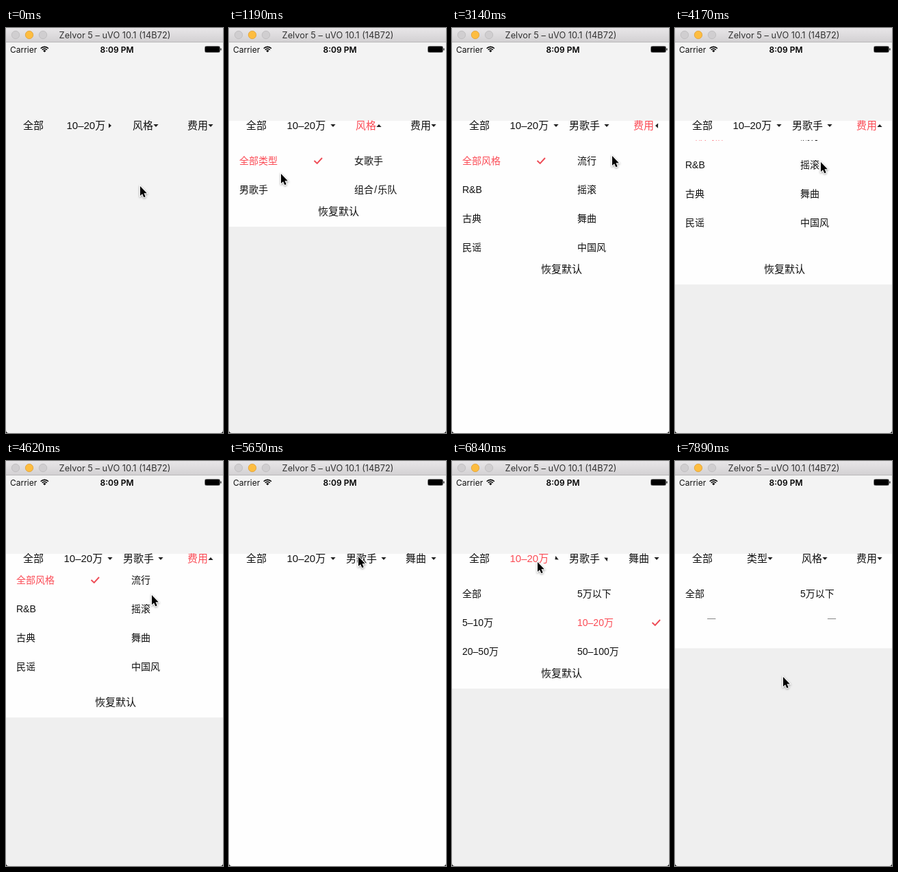
An HTML page with a canvas that plays this animation: 317 px wide and 589 px high, repeating every 8000 ms.

```html
<!DOCTYPE html>
<html lang="zh-CN">
<head>
<meta charset="utf-8">
<style>
html, body { margin: 0; width: 100%; height: 100%; overflow: hidden; background: #f3f3f3; }
canvas { display: block; width: 317px; height: 589px; }
</style>
</head>
<body>
<canvas id="stage"></canvas>
<script>
const W = 317, H = 589, LOOP = 8000, STEP = 148.75;
const RED = '#fb4b55', INK = '#111', PAPER = '#fefefe', GREY = '#f3f3f3', DIM = '#efefef';
const CJK = '"Liberation Sans", "Noto Sans CJK SC", "Noto Sans CJK", sans-serif';
const UI = 'Inter, sans-serif';
const HEADER_END = 163, BUTTON_H = 43, RESIZE = 110, TURN = 500, RESET = 7790;

const canvas = document.getElementById('stage');
const ctx = canvas.getContext('2d');
const ratio = window.devicePixelRatio || 1;
canvas.width = W * ratio;
canvas.height = H * ratio;

// Each tab has a title and, once chosen, a value; x positions are for label and arrow.
const tabs = [
  { title: '类型', x: 105, arrow: 139, value: '10–20万', valueX: 84.5, valueArrow: 152, chosenAt: -250,
    items: ['全部', '5万以下', '5–10万', '10–20万', '20–50万', '50–100万'] },
  { title: '风格', x: 185, arrow: 219, value: '男歌手', valueX: 171, valueArrow: 226, chosenAt: 1990,
    items: ['全部类型', '女歌手', '男歌手', '组合\u200a/\u200a乐队'] },
  { title: '费用', x: 265, arrow: 299, value: '舞曲', valueX: 258, valueArrow: 299, chosenAt: 5130,
    items: ['全部风格', '流行', 'R&B', '摇滚', '古典', '舞曲', '民谣', '中国风'] }
];

const sessions = [
  { tab: 0, open: -2000, close: -250, before: 3, after: 3 },
  { tab: 1, open: 520, close: 1990, before: 0, after: 2 },
  { tab: 2, open: 2870, close: 5130, before: 0, after: 5, scrolls: true },
  { tab: 1, open: 5760, close: 6665, before: 2, after: 2 },
  { tab: 0, open: 6665, close: RESET, before: 3, after: -1, switched: true }
];

// time, x, y
const cursorPath = [
  [0, 196, 230], [450, 204, 145], [560, 204, 145], [1190, 76, 212],
  [1480, 62, 242], [1640, 62, 242], [1780, 65, 242], [2090, 65, 242],
  [2660, 301, 146], [2850, 292, 148], [3124, 234, 186], [3640, 214, 247],
  [3720, 214, 247], [4165, 213, 195], [4920, 213, 195], [5050, 201, 254],
  [5150, 201, 254], [5640, 189, 139], [5900, 189, 139], [6560, 125, 147],
  [6900, 125, 147], [7430, 158, 314]
];
const scrollPath = [[3720, 0], [4165, 36], [4600, 20]];

const clamp = v => Math.min(1, Math.max(0, v));
const smooth = v => { v = clamp(v); return v * v * (3 - 2 * v); };
const mix = (a, b, p) => a + (b - a) * p;

function follow(path, t) {
  const i = path.findIndex(k => k[0] > t);
  if (i < 0) return path[path.length - 1].slice(1);
  if (i === 0) return path[0].slice(1);
  const [a, b] = [path[i - 1], path[i]];
  const p = smooth((t - a[0]) / (b[0] - a[0]));
  return a.slice(1).map((v, j) => mix(v, b[j + 1], p));
}

function text(str, x, y, size, color = INK, family = CJK, weight = 400, align = 'left') {
  ctx.font = `${weight} ${size}px ${family}`;
  ctx.textAlign = align;
  ctx.fillStyle = color;
  ctx.fillText(str, x, y);
}

function rect(x, y, w, h, color) {
  ctx.fillStyle = color;
  ctx.fillRect(x, y, w, h);
}

function trace(points) {
  ctx.beginPath();
  points.forEach(([x, y]) => ctx.lineTo(x, y));
}

function drawTitleBar() {
  const shade = ctx.createLinearGradient(0, 0, 0, 20);
  shade.addColorStop(0, '#e8e6e8');
  shade.addColorStop(1, '#d3d1d3');
  rect(0, 0, W, 20, shade);
  rect(0, 20, W, 1, '#bab8ba');
  [['#d0ced0', '#bcbabc'], ['#fdbd40', '#e0a035'], ['#d0ced0', '#bcbabc']].forEach(([fill, line], i) => {
    ctx.beginPath();
    ctx.arc(14 + 20 * i, 10, 5.7, 0, Math.PI * 2);
    ctx.fillStyle = fill;
    ctx.fill();
    ctx.strokeStyle = line;
    ctx.lineWidth = 0.8;
    ctx.stroke();
  });
  text('Zelvor 5 – uVO 10.1 (14B72)', 159, 15, 12.8, '#333', UI, 400, 'center');
}

function drawStatusBar() {
  text('Carrier', 6, 35.5, 12, INK, UI);
  text('8:09 PM', 162, 35.5, 12, '#000', UI, 600, 'center');
  ctx.strokeStyle = ctx.fillStyle = '#000';
  ctx.lineWidth = 1.6;
  for (const r of [7.9, 5]) {
    ctx.beginPath();
    ctx.arc(56.3, 35.3, r, -Math.PI * 0.75, -Math.PI * 0.25);
    ctx.stroke();
  }
  ctx.beginPath();
  ctx.moveTo(56.3, 35.3);
  ctx.arc(56.3, 35.3, 3, -Math.PI * 0.75, -Math.PI * 0.25);
  ctx.fill();
  ctx.strokeStyle = '#777';
  ctx.lineWidth = 1;
  ctx.beginPath();
  ctx.roundRect(290.5, 26.5, 22, 9, 2);
  ctx.stroke();
  ctx.beginPath();
  ctx.roundRect(291, 27, 21, 8, 1);
  ctx.fill();
  ctx.fillRect(313.3, 29.5, 1.2, 3);
}

function arrowAngle(tab, t) {
  if (t >= RESET) return 0;
  const last = sessions.filter(s => s.tab === tab && s.open <= t).pop();
  if (!last) return 0;
  return Math.PI * (smooth((t - last.open) / TURN) + smooth((t - last.close) / TURN));
}

function drawTabs(t, active) {
  text('全部', 25, 147, 15);
  tabs.forEach((tab, i) => {
    const chosen = t >= tab.chosenAt && t < RESET;
    const settling = chosen && t - tab.chosenAt < 300 ? 4 : 0;
    text(chosen ? tab.value : tab.title, chosen ? tab.valueX + settling : tab.x, 147, 15,
      i === active ? RED : INK);
    ctx.save();
    ctx.translate(chosen ? tab.valueArrow : tab.arrow, 142);
    ctx.rotate(arrowAngle(i, t));
    trace([[-3.6, -2], [3.6, -2], [0, 2]]);
    ctx.fillStyle = '#222';
    ctx.fill();
    ctx.restore();
  });
}

function drawMenu(session, t) {
  const { items } = tabs[session.tab];
  const closing = t >= session.close;
  const full = items.length * 21 - 1;
  const start = session.switched ? 83 : 0;
  const height = closing
    ? full * (1 - clamp((t - session.close) / 200))
    : mix(start, full, clamp((t - session.open) / RESIZE));
  const bottom = HEADER_END + height + BUTTON_H;
  const dimmed = session.switched || t - session.open > 350;
  if (dimmed) rect(0, bottom, W, H - bottom, DIM);

  const selected = closing ? session.after : session.before;
  const offset = session.scrolls ? follow(scrollPath, t)[0] : 0;
  ctx.save();
  ctx.beginPath();
  ctx.rect(0, HEADER_END, W, height);
  ctx.clip();
  items.forEach((item, i) => {
    const x = 15 + 168 * (i % 2);
    const y = 193 + 42 * Math.floor(i / 2) - offset;
    text(item, x, y + 5, 14, i === selected ? RED : INK);
    if (i === selected) {
      trace([[x + 109.5, y], [x + 113.7, y + 4], [x + 121, y - 4]]);
      ctx.strokeStyle = '#ee4b55';
      ctx.lineWidth = 1.9;
      ctx.stroke();
    }
  });
  ctx.restore();
  if (!closing) text('恢复默认', 130, bottom - 17, 15);
}

function drawCursor(x, y) {
  ctx.save();
  ctx.translate(x, y);
  trace([[0, 0], [0, 14], [3.1, 11.2], [5.4, 16.3], [7.7, 15.3], [5.5, 10.3], [9.8, 10.3]]);
  ctx.closePath();
  ctx.shadowColor = 'rgba(0,0,0,.4)';
  ctx.shadowBlur = 3 * ratio;
  ctx.shadowOffsetY = ratio;
  ctx.strokeStyle = '#fff';
  ctx.lineWidth = 2;
  ctx.stroke();
  ctx.shadowColor = 'transparent';
  ctx.fillStyle = '#000';
  ctx.fill();
  ctx.restore();
}

function drawCorners() {
  ctx.fillStyle = '#111';
  for (const x of [0, W]) {
    ctx.beginPath();
    ctx.moveTo(x, H - 4);
    ctx.quadraticCurveTo(x, H, x ? W - 4 : 4, H);
    ctx.lineTo(x, H);
    ctx.fill();
  }
}

function render(t) {
  ctx.setTransform(ratio, 0, 0, ratio, 0, 0);
  rect(0, 0, W, H, GREY);
  if (t >= sessions[1].open) rect(0, 135, W, H - 135, PAPER);
  const session = sessions.filter(s => s.open <= t).pop();
  const isOpen = t < session.close;
  if (session.open > 0 && t < session.close + 200) drawMenu(session, t);
  drawTabs(t, isOpen ? session.tab : -1);
  drawTitleBar();
  drawStatusBar();
  drawCorners();
  drawCursor(...follow(cursorPath, t));
}

// The screen refreshes in even steps, about seven a second.
const began = performance.now();
function tick() {
  const t = (performance.now() - began) % LOOP;
  render(Math.floor((t + 9) / STEP) * STEP);
  requestAnimationFrame(tick);
}
tick();
</script>
</body>
</html>
```
